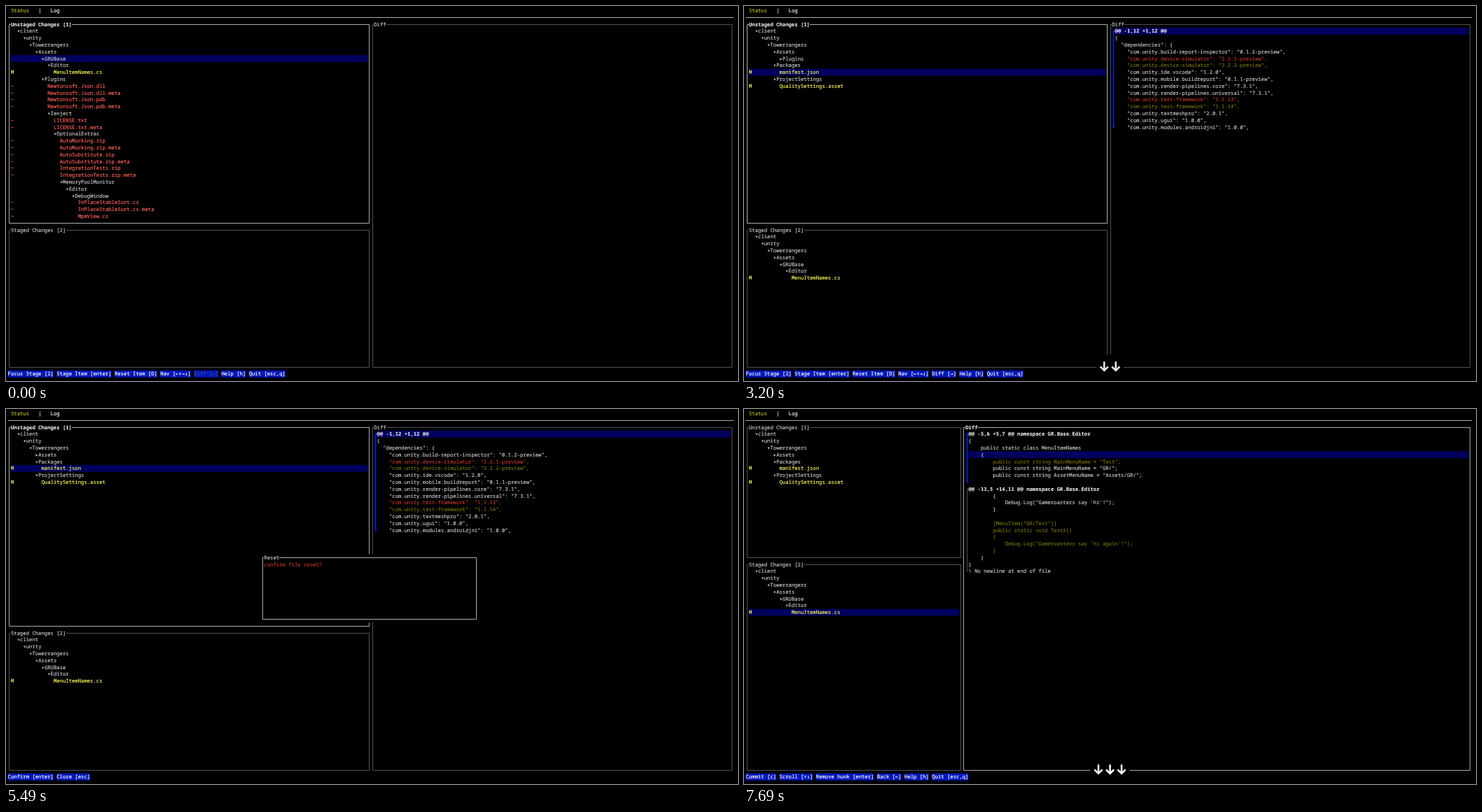
An HTML page for the animation above (7.99 s loop, 1045 px wide and 536 px high).

```html
<!DOCTYPE html>
<html lang="en">
<head>
<meta charset="utf-8">
<title>Terminal git client</title>
<style>
  html, body { margin: 0; width: 100%; height: 100%; overflow: hidden; background: #000; }
  svg { display: block; width: 1045px; height: 536px; }
  text {
    font: 500 7.258px "Noto Sans Mono", "DejaVu Sans Mono", monospace;
    white-space: pre;
    text-rendering: geometricPrecision;
    fill: currentColor;
    stroke: currentColor;
    stroke-width: .16px;
  }
  .bold { font-weight: 700; stroke: none; }
  .symbol { font-family: "DejaVu Sans Mono", monospace; }
  .key { font: 700 19.5px Inter, "DejaVu Sans", sans-serif; color: #fff; stroke: none; text-anchor: middle; }
  .arrow { fill: none; stroke: #fff; stroke-width: 2.5; }
</style>
</head>
<body>
<svg id="screen" viewBox="0 0 1045 536"></svg>
<script>
const LOOP = 7990;
const CELL_W = 4.355, CELL_H = 9.8, LEFT = 2.6, TOP = 1.6;
const C = {
  text: '#c8c8c8', white: '#fff', yellow: '#fafa58', tab: '#b8b81e',
  red: '#ff6259', darkRed: '#be3228', olive: '#726e08',
  select: '#00005e', command: '#0018bc', disabled: '#3f4a86', hunk: '#0a1cea',
  focus: '#acacac', border: '#525252'
};

const ROOT = ['▾client', ' ▾unity', '  ▾Towerrangers'];
const BASE = ['    ▾GRUBase', '     ▾Editor', '      MMenuItemNames.cs'];
const SETTINGS = ['   ▾Packages', '    Mmanifest.json', '   ▾ProjectSettings', '    MQualitySettings.asset'];
const withMeta = (indent, names) =>
  names.flatMap(name => [`${indent}−${name}`, `${indent}−${name}.meta`]);

const TREES = {
  full: [
    ...ROOT, '   ▾Assets', ...BASE, '    ▾Plugins',
    ...withMeta('     ', ['Newtonsoft.Json.dll', 'Newtonsoft.Json.pdb']),
    '     ▾Zenject', ...withMeta('      ', ['LICENSE.txt']),
    '      ▾OptionalExtras',
    ...withMeta('       ', ['AutoMocking.zip', 'AutoSubstitute.zip', 'IntegrationTests.zip']),
    '       ▾MemoryPoolMonitor', '        ▾Editor', '         ▾DebugWindow',
    ...withMeta('          ', ['InPlaceStableSort.cs']), '          −MpmView.cs'
  ],
  folded: [...ROOT, '   ▾Assets', ...BASE, '    ▸Plugins', ...SETTINGS],
  partial: [...ROOT, '   ▾Assets', '    ▸Plugins', ...SETTINGS],
  short: [...ROOT, '   ▸Assets', ...SETTINGS],
  staged: [...ROOT, '   ▾Assets', ...BASE],
  empty: []
};

// The first character of a line is its diff marker.
const DIFFS = {
  none: [],
  manifest: [`@@ -1,12 +1,12 @@
 {
   "dependencies": {
     "com.unity.build-report-inspector": "0.1.2-preview",
-    "com.unity.device-simulator": "2.2.1-preview",
+    "com.unity.device-simulator": "2.2.2-preview",
     "com.unity.ide.vscode": "1.2.0",
     "com.unity.mobile.buildreport": "0.1.1-preview",
     "com.unity.render-pipelines.core": "7.3.1",
     "com.unity.render-pipelines.universal": "7.3.1",
-    "com.unity.test-framework": "1.1.13",
+    "com.unity.test-framework": "1.1.14",
     "com.unity.textmeshpro": "2.0.1",
     "com.unity.ugui": "1.0.0",
     "com.unity.modules.androidjni": "1.0.0",`],
  menu: [`@@ -5,6 +5,7 @@ namespace GR.Base.Editor
 {
     public static class MenuItemNames
     {
+        public const string MainMenuName = "Test";
         public const string MainMenuName = "GR/";
         public const string AssetMenuName = "Assets/GR/";
 `, `@@ -13,5 +14,11 @@ namespace GR.Base.Editor
         {
             Debug.Log("Gameroasters say 'hi'!");
         }
+
+        [MenuItem("GR/Test")]
+        public static void Test2()
+        {
+            Debug.Log("Gameroasters say 'hi again'!");
+        }
     }
 }
 \\ No newline at end of file`]
};

const COMMANDS = {
  unstaged: 'Focus Stage [2]|Stage Item [enter]|Reset Item [D]|Nav [←↑→↓]|Diff [→]|Help [h]|Quit [esc,q]',
  staged: 'Focus Unstaged [1]|Commit [c]|Unstage Item [enter]|Nav [←↑→↓]|Diff [→]|Help [h]|Quit [esc,q]',
  diff: 'Commit [c]|Scroll [↑↓]|Remove hunk [enter]|Back [←]|Help [h]|Quit [esc,q]',
  popup: 'Confirm [enter]|Close [esc]'
};

// Each entry changes part of the state from its time on.
const TIMELINE = [
  [0, { focus: 'unstaged', tree: 'full', index: 'empty', row: 4, diff: 'none', line: 0, popup: false, keys: '', fade: 1 }],
  [100, { row: 5, keys: '↓' }],
  [200, { row: 6, diff: 'menu', keys: '↓↓' }],
  [400, { fade: .5 }],
  [500, { keys: '' }],
  [1200, { row: 7, diff: 'none', keys: '↓', fade: 1 }],
  [1500, { tree: 'folded', keys: '←' }],
  [1800, { fade: .5 }],
  [1900, { keys: '' }],
  [2100, { row: 6, diff: 'menu', keys: '↑', fade: 1 }],
  [2500, { tree: 'partial', index: 'staged', diff: 'manifest', keys: '↩' }],
  [2800, { fade: .5 }],
  [2900, { keys: '' }],
  [3200, { keys: '↓↓', fade: .9 }],
  [3300, { row: 5, diff: 'none', keys: '↑', fade: 1 }],
  [3400, { row: 4 }],
  [3700, { row: 3, keys: '↑←' }],
  [3800, { tree: 'short', keys: '↑←←' }],
  [4100, { fade: .5 }],
  [4200, { keys: '' }],
  [4690, { row: 4, keys: '↓', fade: 1 }],
  [4790, { row: 5, diff: 'manifest', keys: '↓↓' }],
  [5090, { popup: true, keys: 'D' }],
  [5490, { keys: '' }],
  [6390, { popup: false }],
  [6790, { focus: 'staged', row: 0, diff: 'none', keys: '2' }],
  [6890, { row: 1, keys: '2↓' }],
  [6990, { row: 2, keys: '2↓↓↓' }],
  [7090, { row: 4, keys: '2↓↓↓↓' }],
  [7190, { row: 5, keys: '2↓↓↓↓↓↓' }],
  [7290, { row: 6, diff: 'menu' }],
  [7390, { focus: 'diff', keys: '→' }],
  [7490, { line: 1, keys: '↓' }],
  [7590, { line: 2, keys: '↓↓' }],
  [7690, { line: 3, keys: '↓↓↓' }]
];

const cellX = col => LEFT + col * CELL_W;
const cellY = row => TOP + row * CELL_H;
// Lines run through cell centres, snapped to whole pixels.
const snap = v => Math.floor(v) + .5;
const midX = col => snap(cellX(col + .5));
const midY = row => snap(cellY(row + .5));

const rect = (x, y, w, h, fill) =>
  `<rect x="${x}" y="${y}" width="${w}" height="${h}" fill="${fill}"/>`;
const fillCells = (col, row, cols, rows, fill) =>
  rect(cellX(col), cellY(row), cols * CELL_W, rows * CELL_H, fill);
const path = (d, stroke, width = 1) =>
  `<path d="${d}" fill="none" stroke="${stroke}" stroke-width="${width}"/>`;
const label = (col, row, str, color = C.text, bold = false) =>
  `<text x="${cellX(col)}" y="${cellY(row) + 7.4}" color="${color}"${bold ? ' class="bold"' : ''}>${
    str.replace(/[←↑→↓▾▸]+/g, '<tspan class="symbol">$&</tspan>')}</text>`;

function panel(title, left, top, right, bottom, stroke, focused) {
  return path(`M${midX(left)} ${midY(top)}H${midX(right)}V${midY(bottom)}H${midX(left)}Z`, stroke) +
    fillCells(left + 1, top, title.length, 1, '#000') +
    label(left + 1, top, title, focused ? C.white : C.text, focused);
}

function treeRows(lines, top, right, selected) {
  return lines.map((line, i) => {
    const item = line.trimStart();
    const col = 3 + 2 * (line.length - item.length);
    const row = top + 1 + i;
    const bar = i === selected ? fillCells(1, row, right - 1, 1, C.select) : '';
    if ('▾▸'.includes(item[0])) return bar + label(col, row, item);
    const color = item[0] === 'M' ? C.yellow : C.red;
    return bar + label(1, row, item[0], color) + label(col, row, item.slice(1), color);
  }).join('');
}

function diffRows(hunks, left, selected) {
  const colors = { '+': C.olive, '-': C.darkRed };
  let row = 3, out = '';
  for (const hunk of hunks) {
    const lines = hunk.split('\n');
    const first = row - 3, last = first + lines.length - 1;
    const active = selected >= first && selected <= last;
    if (active) out += fillCells(left + 2, selected + 3, 235 - left, 1, C.select);
    out += path(`M${cellX(left + 2)} ${midY(row)}H${midX(left + 1)}V${midY(last + 3)}H${cellX(left + 2)}`,
      active ? C.hunk : C.border, active ? 1.8 : 1);
    for (const line of lines) {
      const header = line[0] === '@';
      out += label(left + 2, row++, header ? line : line.slice(1),
        header ? C.white : colors[line[0]] || C.text, header);
    }
  }
  return out;
}

function commandBar(commands, canDiff) {
  let col = 0;
  return commands.split('|').map(cmd => {
    const color = cmd.startsWith('Diff') && !canDiff ? C.disabled : C.white;
    const out = fillCells(col, 53, cmd.length, 1, C.command) + label(col, 53, cmd, color);
    col += cmd.length + 1;
    return out;
  }).join('');
}

function keyOverlay(keys, opacity) {
  if (!keys) return '';
  const angles = { '↓': 0, '←': 90, '↑': 180, '→': 270 };
  const widthOf = key => key === '2' ? 13 : 16.5;
  const width = [...keys].reduce((sum, key) => sum + widthOf(key), 0);
  let x = 522.5 - width / 2;
  let out = rect(x - 3.5, 498, width + 7, 25, '#000');
  for (const key of keys) {
    const center = x + widthOf(key) / 2;
    out += key in angles
      ? `<path class="arrow" transform="translate(${center} 515.3) rotate(${angles[key]})" d="M0-7V5.5M-5.6 .2L0 5.8L5.6 .2"/>`
      : `<text class="key" x="${center}" y="522.3">${key}</text>`;
    x += widthOf(key);
  }
  return `<g opacity="${opacity}">${out}</g>`;
}

function resetPopup() {
  return rect(364, cellY(21), 309, 10 * CELL_H, '#000') +
    panel('Reset', 83, 21, 153, 30, C.focus, false) +
    label(84, 22, 'confirm file reset?', C.darkRed);
}

function draw(s) {
  const split = s.focus === 'diff' ? 70 : 118;
  const stagedTop = s.focus === 'unstaged' ? 32 : 22;
  const onUnstaged = s.focus === 'unstaged';
  const frame = (name, title, ...box) =>
    panel(title, ...box, s.focus === name ? C.focus : C.border, s.focus === name);
  return rect(0, 0, 1045, 536, '#000') +
    label(1, 0, 'Status', C.tab) + label(10, 0, '|', C.white) + label(14, 0, 'Log', C.white) +
    path(`M${LEFT} ${midY(1)}H1039`, C.focus) +
    frame('unstaged', 'Unstaged Changes [1]', 0, 2, split, stagedTop - 1) +
    treeRows(TREES[s.tree], 2, split, onUnstaged ? s.row : -1) +
    frame('staged', 'Staged Changes [2]', 0, stagedTop, split, 52) +
    treeRows(TREES[s.index], stagedTop, split, onUnstaged ? -1 : s.row) +
    frame('diff', 'Diff', split + 1, 2, 237, 52) +
    diffRows(DIFFS[s.diff], split + 1, s.line) +
    (s.popup ? resetPopup() : '') +
    commandBar(COMMANDS[s.popup ? 'popup' : s.focus], s.diff !== 'none') +
    keyOverlay(s.keys, s.fade);
}

const screen = document.getElementById('screen');
let shown = -1;
function tick() {
  const time = performance.now() % LOOP;
  const past = TIMELINE.filter(([start]) => start <= time);
  if (past.length !== shown) {
    shown = past.length;
    screen.innerHTML = draw(Object.assign({}, ...past.map(([, change]) => change)));
  }
  requestAnimationFrame(tick);
}
tick();
</script>
</body>
</html>
```
